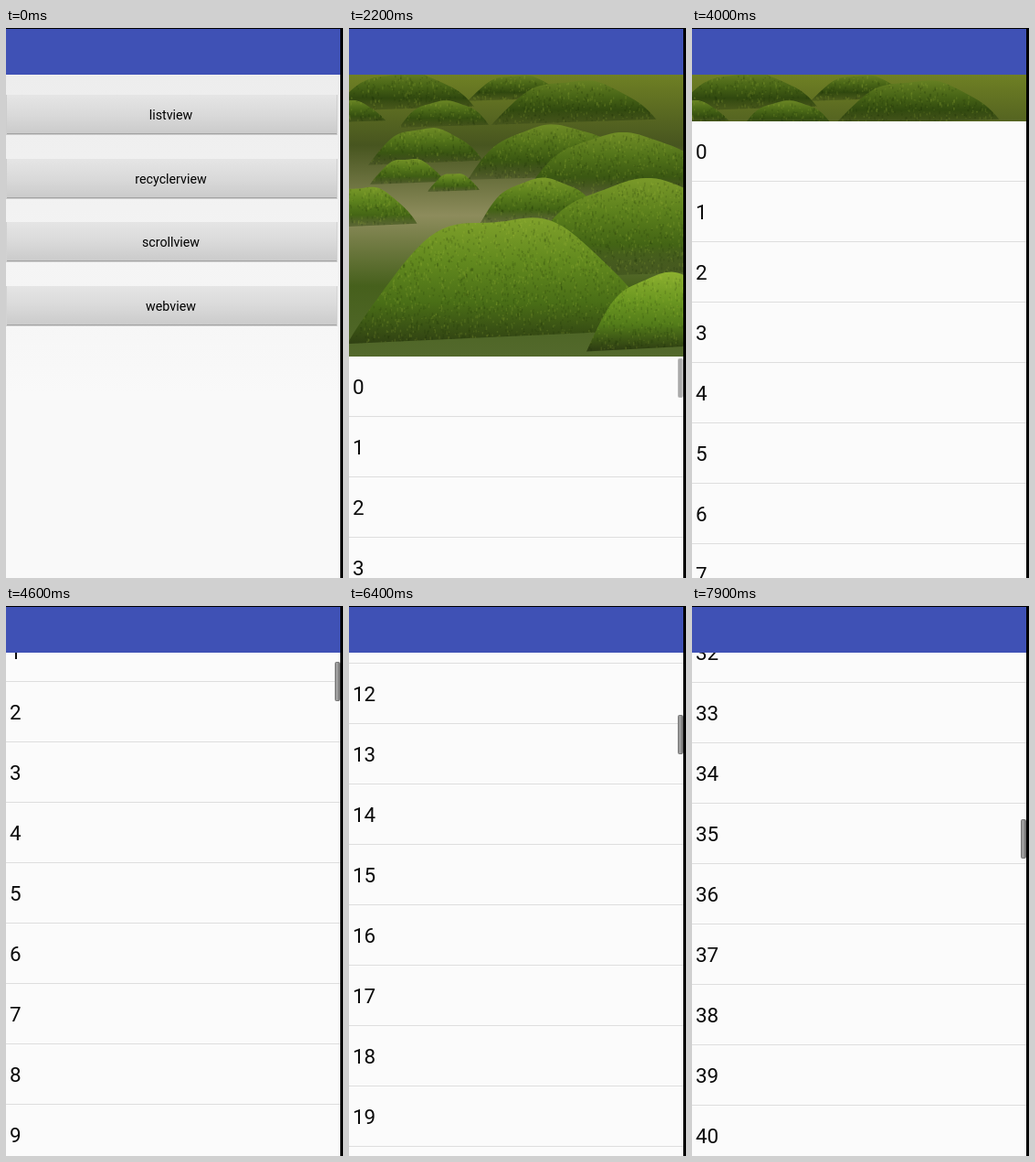
Animation, 369 px wide and 601 px high, one loop 8000 ms. Source, as an HTML page with a canvas:

```html
<!DOCTYPE html>
<html lang="en">
<head>
<meta charset="utf-8">
<title>Collapsing header list</title>
<style>
  html, body { margin: 0; width: 100%; height: 100%; overflow: hidden; background: #000; }
  canvas { display: block; }
</style>
</head>
<body>
<canvas id="stage" width="369" height="601"></canvas>
<script>
const ctx = document.getElementById('stage').getContext('2d');
const LOOP = 8000, STEP = 100;
const WIDTH = 366, HEIGHT = 601, BAR = 51, HEADER = 308, ROW = 66;

// Mossy mounds from back to front: centre x, top y, half width.
const MOUNDS = [
  [60, 50, 80], [185, 52, 55], [248, 58, 92], [105, 80, 50],
  [85, 110, 64], [225, 107, 95], [300, 116, 112], [-4, 79, 46],
  [65, 143, 42], [212, 165, 70], [115, 159, 29], [15, 174, 62],
  [325, 167, 145], [172, 208, 174], [350, 269, 90]
];

function createLayer(width, height) {
  const canvas = document.createElement('canvas');
  canvas.width = width;
  canvas.height = height;
  return canvas.getContext('2d');
}

function random(seed) {
  return () => (seed = (seed * 16807) % 2147483647) / 2147483647;
}

function verticalGradient(c, y0, y1, ...colors) {
  const fill = c.createLinearGradient(0, y0, 0, y1);
  colors.forEach((color, i) => fill.addColorStop(i / (colors.length - 1), color));
  return fill;
}

function paintMound(c, rnd, [x, top, half]) {
  const depth = (top - 50) / 160;
  const height = half * (0.5 + depth * 0.3);
  const light = 31 + depth * 9;
  c.save();
  c.beginPath();
  for (let u = -1; u <= 1; u += 0.04) {
    const wobble = Math.sin(u * 9 + x) * 0.03;
    c.lineTo(x + u * half, top + height * (Math.abs(u) ** 2.4 + wobble));
  }
  c.closePath();
  c.fillStyle = verticalGradient(c, top, top + height,
    `hsl(77 58% ${light}%)`, `hsl(82 64% ${light - 7}%)`,
    `hsl(85 66% ${light - 14}%)`, `hsl(82 55% 16% / ${depth > 0.9 ? 1 : 0.35})`);
  c.fill();
  c.clip();
  // Fine flecks give the moss its grain.
  for (let i = half * height / 9; i > 0; i--) {
    c.fillStyle = rnd() < 0.55 ? 'rgba(20,40,0,.16)' : 'rgba(180,205,70,.14)';
    c.fillRect(x + (rnd() * 2 - 1) * half, top + rnd() * height, 1.5, 1 + rnd() * 3);
  }
  c.restore();
}

function paintLandscape() {
  const c = createLayer(WIDTH, HEADER);
  const rnd = random(41);
  c.translate(0, -BAR);
  c.fillStyle = verticalGradient(c, BAR, BAR + HEADER, '#6f8024', '#47551f', '#8d8c5c', '#46601c', '#53692c');
  c.fillRect(0, BAR, WIDTH, HEADER);
  MOUNDS.forEach(mound => paintMound(c, rnd, mound));
  return c.canvas;
}
const landscape = paintLandscape();

// Each gesture carries the list on to a new scroll offset.
const drag = p => p ** 1.18;
const fling = p => 1 - (1 - p ** 1.2) ** 2.6;
const GESTURES = [
  { start: 3000, end: 4000, to: 257, ease: drag },
  { start: 4000, end: 5000, to: 431, ease: fling },
  { start: 6200, end: 7100, to: 2192, ease: fling },
  { start: 7400, end: 7900, to: 2453, ease: drag }
];

function scrollAt(t) {
  let scroll = 0;
  for (const { start, end, to, ease } of GESTURES) {
    if (t > start) scroll += (to - scroll) * ease(Math.min(1, (t - start) / (end - start)));
  }
  return Math.round(scroll);
}

// The thumb shows while scrolling and fades out after a pause.
function thumbAlpha(t, scroll) {
  const fadeFrom = start => Math.max(0, Math.min(1, 0.5 - (t - start) / 400));
  if (t < 3000) return fadeFrom(2200);
  if (t < 6300) return scroll > HEADER ? fadeFrom(5500) : 0;
  return 1;
}

function drawToolbar(c) {
  c.fillStyle = '#3f51b5';
  c.fillRect(0, 1, WIDTH, BAR - 1);
}

function drawMenu(c) {
  c.fillStyle = verticalGradient(c, BAR, 400, '#ededed', '#f9f9f9');
  c.fillRect(0, 0, WIDTH, HEIGHT);
  c.font = '14.24px Roboto, sans-serif';
  c.textAlign = 'center';
  ['listview', 'recyclerview', 'scrollview', 'webview'].forEach((label, i) => {
    const y = Math.round(73 + i * 69.5);
    c.fillStyle = 'rgba(0,0,0,.14)';
    c.fillRect(0, y, 363, 44);
    c.fillStyle = '#a2a2a2';
    c.fillRect(1, y + 1, 361, 42);
    c.fillStyle = verticalGradient(c, y, y + 42, '#e5e5e5', '#dadada', '#cbcbcb');
    c.fillRect(1, y, 361, 42);
    c.fillStyle = '#000';
    c.fillText(label, 180.5, y + 27);
  });
  drawToolbar(c);
}

function drawThumb(c, y, alpha) {
  c.globalAlpha = alpha;
  c.fillStyle = '#777';
  c.beginPath();
  c.roundRect(360, y, 6, 43, 2);
  c.fill();
  c.fillStyle = '#9c9c9c';
  c.fillRect(361, y + 1, 3, 41);
  c.globalAlpha = 1;
}

function drawList(c, t) {
  const scroll = scrollAt(t);
  const headerHeight = Math.max(0, HEADER - scroll);
  const top = BAR + HEADER - scroll;
  c.fillStyle = '#fbfbfb';
  c.fillRect(0, 0, WIDTH, HEIGHT);
  c.font = '22.4px Roboto, sans-serif';
  c.textAlign = 'left';
  for (let i = Math.max(0, Math.floor((BAR - top) / ROW)); top + i * ROW < HEIGHT; i++) {
    const y = top + i * ROW;
    c.fillStyle = '#dedede';
    c.fillRect(0, y + ROW - 1, WIDTH, 1);
    c.fillStyle = '#0a0a0a';
    c.fillText(i, 4, y + 41);
  }
  if (headerHeight) c.drawImage(landscape, 0, 0, WIDTH, headerHeight, 0, BAR, WIDTH, headerHeight);
  const listScroll = Math.max(0, scroll - HEADER);
  drawThumb(c, Math.round(BAR + headerHeight + 2 + listScroll * 0.084), thumbAlpha(t, scroll));
  drawToolbar(c);
}

const screen = createLayer(WIDTH, HEIGHT);
function draw(t) {
  ctx.fillStyle = '#000';
  ctx.fillRect(0, 0, 369, HEIGHT);
  ctx.save();
  ctx.beginPath();
  ctx.rect(0, 1, WIDTH, HEIGHT);
  ctx.clip();
  drawMenu(ctx);
  if (t >= 1500) {
    // The list screen fades in while rising to its place.
    const entered = Math.min(1, (t - 1400) / 300);
    drawList(screen, t);
    ctx.globalAlpha = entered;
    ctx.drawImage(screen.canvas, 0, Math.round(57 * (1 - entered)));
  }
  ctx.restore();
}

const began = performance.now();
function tick() {
  const t = (performance.now() - began) % LOOP;
  draw(Math.floor(t / STEP) * STEP);
  requestAnimationFrame(tick);
}
tick();
</script>
</body>
</html>
```
